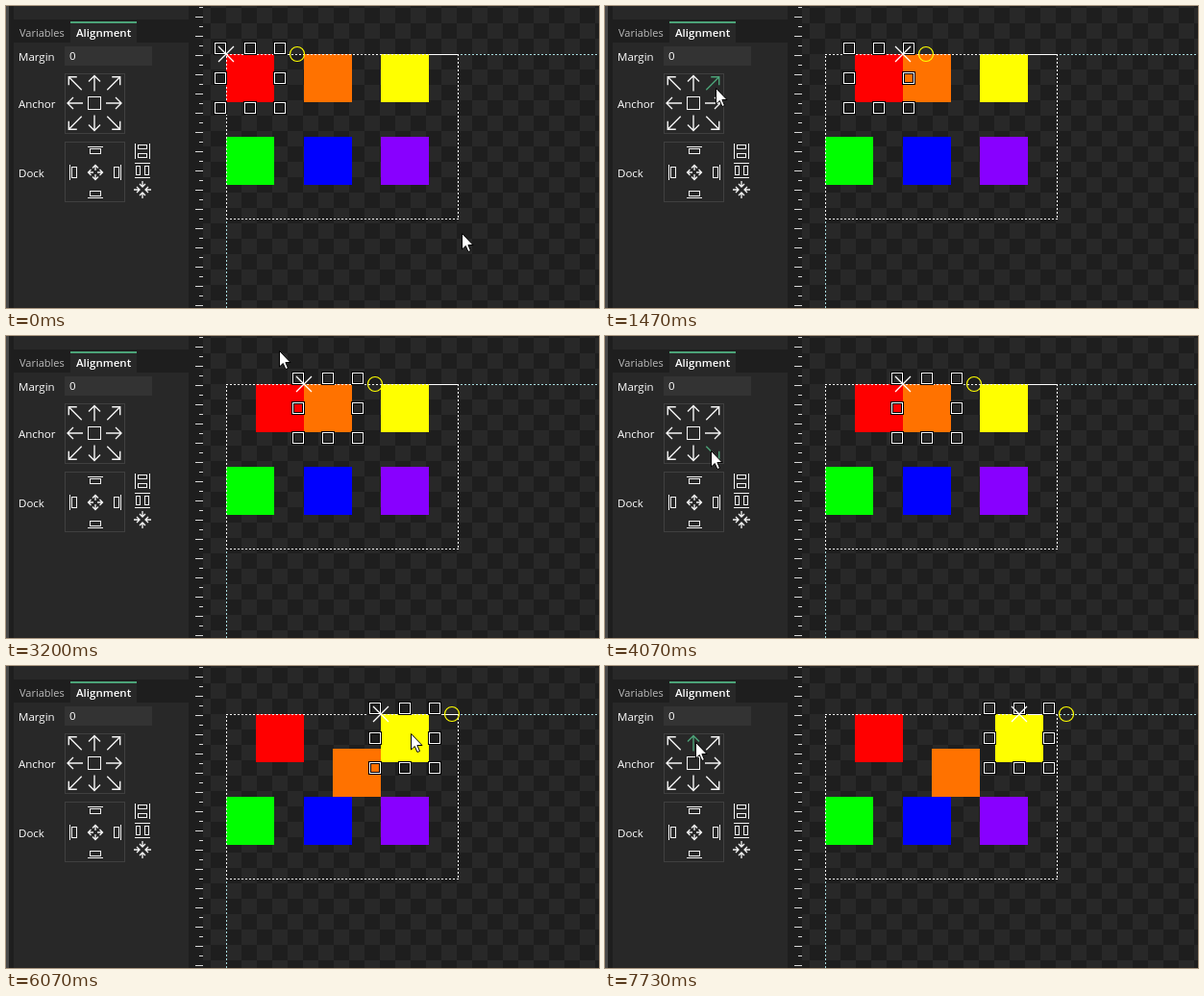
An HTML page with a canvas that plays this animation: 617x314 px, repeating every 8 s.

```html
<!DOCTYPE html>
<html lang="en">
<head>
<meta charset="utf-8">
<style>
html, body { margin: 0; width: 100%; height: 100%; overflow: hidden; background: #282828; }
canvas, svg { position: absolute; left: 0; top: 0; display: block; }
text { font: 11.5px "Open Sans", "Noto Sans", sans-serif; fill: #fff; }
</style>
</head>
<body>
<canvas id="stage" width="617" height="314"></canvas>
<svg width="617" height="314">
  <text x="14" y="32" style="font-size:11px;fill:#bbb">Variables</text>
  <text x="73" y="32" style="font-weight:600">Alignment</text>
  <text x="13" y="57">Margin</text>
  <text x="66" y="56">0</text>
  <text x="13" y="106">Anchor</text>
  <text x="13" y="178">Dock</text>
</svg>
<script>
const c = document.getElementById('stage').getContext('2d');
const LOOP = 8000, GREEN = '#4ca378', INK = '#f4f4f4', QUARTER = Math.PI / 2;
const BOX = { x: 229, y: 50, w: 241, h: 171 };

// Pointer moves, timed in ticks of 1/15 s; bow lifts the middle of the way
const START = [474, 236];
const moves = [
  { from: 0, to: 12, end: [115, 85], bow: 0 },
  { from: 27, to: 31.5, end: [346, 70], bow: 75 },
  { from: 46, to: 52, end: [106, 118], bow: 88 },
  { from: 52, to: 61, end: [110, 119], bow: 0 },
  { from: 71, to: 77, end: [402, 65], bow: 0 },
  { from: 77, to: 82, end: [421, 70], bow: 0 },
  { from: 96, to: 109, end: [98, 78], bow: 0 },
  { from: 109, to: 112, end: [94, 79], bow: 0 }
];

function mouseAt(n) {
  let [x, y] = START;
  for (const { from, to, end, bow } of moves) {
    if (n <= from) break;
    const t = Math.min(1, (n - from) / (to - from)), u = t * t * (3 - 2 * t);
    x += (end[0] - x) * u;
    y += (end[1] - y) * u - bow * 4 * u * (1 - u);
  }
  return [Math.round(x), Math.round(y)];
}

function squaresAt(n) {
  const sq = (color, x, y, px = 0, py = 0) => ({ color, x, y, px, py, w: 50, h: 50 });
  return [
    n < 22 ? sq('#f00', 229, 50) : sq('#f00', 260, 50, 1, 0),
    n < 66 ? sq('#ff7200', 310, 50) : sq('#ff7200', 340, 86, 1, 1),
    n < 116 ? sq('#ff0', 390, 50) : sq('#ff0', 406, 50, .5, 0),
    sq('#0f0', 229, 136), sq('#00f', 310, 136), sq('#80f', 390, 136)
  ];
}

const inside = (r, [x, y]) => x >= r.x && x < r.x + r.w && y >= r.y && y < r.y + r.h;

function fill(color, x, y, w, h) {
  c.fillStyle = color;
  c.fillRect(x, y, w, h);
}

function frame(color, x, y, w, h) {
  c.strokeStyle = color;
  c.lineWidth = 1;
  c.strokeRect(x + .5, y + .5, w, h);
}

// Each argument after width is one polyline as a flat list
function lines(color, width, ...polys) {
  c.strokeStyle = color;
  c.lineWidth = width;
  c.beginPath();
  for (const p of polys)
    for (let i = 0; i < p.length; i += 2) c[i ? 'lineTo' : 'moveTo'](p[i], p[i + 1]);
  c.stroke();
}

function dashed(color, ...polys) {
  c.setLineDash([2, 2]);
  lines(color, 1, ...polys);
  c.setLineDash([]);
}

// Clockwise, so the dashes of each side start at its own corner
function dashedFrame(color, x, y, w, h) {
  const r = x + w, b = y + h;
  dashed(color, [x, y + .5, r + 1, y + .5], [r + .5, y, r + .5, b + 1],
    [r + 1, b + .5, x, b + .5], [x + .5, b + 1, x + .5, y]);
}

function at(x, y, angle, draw) {
  c.save();
  c.translate(x, y);
  c.rotate(angle);
  draw();
  c.restore();
}

// Arrow along x: shaft from a to b, head at b
function arrow(color, width, a, b, head) {
  const back = b - Math.sign(b - a) * head;
  lines(color, width, [a, 0, b, 0], [back, -head, b, 0, back, head]);
}

function drawAnchor(mouse) {
  frame('#404040', 61, 70, 62, 62);
  for (let row = -1; row < 2; row++) for (let col = -1; col < 2; col++) {
    const x = 92 + col * 20, y = 101 + row * 20.5;
    const lit = Math.abs(mouse[0] - x) < 10 && Math.abs(mouse[1] - y) < 10;
    const color = lit ? GREEN : INK;
    if (!row && !col) { frame(color, 85, 94, 13, 13); continue; }
    const r = row && col ? 9.5 : 8;
    at(x, y, Math.atan2(row, col), () => arrow(color, 1.4, -r, r, 6));
  }
}

function drawDock() {
  frame('#404040', 61, 141, 62, 62);
  for (let i = 0; i < 4; i++) {
    at(93, 173, i * QUARTER, () => {
      lines(INK, 1, [26.5, -8, 26.5, 8]);
      c.strokeRect(19.5, -5.5, 5, 11);
      arrow(INK, 1.3, 2, 7.5, 3);
    });
    at(142, 191, i * QUARTER, () => arrow(INK, 1.3, 9, 3, 3));
  }
  for (let i = 0; i < 2; i++) at(142, 151 + i * 20, i * QUARTER, () => {
    lines(INK, 1, [-7.5, -8, -7.5, 8], [7.5, -8, 7.5, 8]);
    for (const y of [-6.5, 2.5]) c.strokeRect(-4.5, y, 9, 4);
  });
}

function drawPanel(mouse) {
  fill('#1e1e1e', 0, 0, 205, 314);
  fill('#484848', 0, 0, 3, 314);
  fill('#282828', 8, 0, 182, 14);
  fill('#282828', 8, 38, 182, 276);
  fill('#282828', 67, 16, 69, 22);
  fill(GREEN, 67, 16, 69, 2);
  fill('#333', 61, 42, 91, 20);
  drawAnchor(mouse);
  drawDock();
  for (let y = 0; y < 314; y += 10) {
    const w = y % 20 ? 8 : 4;
    fill('#d8d8d8', 205 - w, y + 1, w, 1);
  }
}

function drawChecker() {
  fill('#1e1e1e', 0, 0, 617, 314);
  for (let j = 0; j < 21; j++) for (let i = 0; i < 27; i++)
    if ((i + j) % 2) fill('#282828', 197 + i * 16, j * 16 - 14, 16, 16);
}

function drawSelection(s) {
  const cx = s.x + 25, cy = s.y + 25, px = s.x + s.px * 50, py = s.y + s.py * 50;
  for (let j = -1; j < 2; j++) for (let i = -1; i < 2; i++) if (i || j) {
    const x = cx + i * 31 - 6, y = cy + j * 31 - 6;
    frame('#000', x - 1, y - 1, 13, 13);
    frame('#000', x + 1, y + 1, 9, 9);
    frame('#fff', x, y, 11, 11);
  }
  at(px, py, 0, () => lines('#fff', 1.3, [-8, -8, 8, 8], [-8, 8, 8, -8]));
  c.strokeStyle = '#ff0';
  c.lineWidth = 1.2;
  c.beginPath();
  c.arc(cx + 49, py, 7.5, 0, 7);
  c.stroke();
}

function drawCursor([x, y], move) {
  const trace = p => { for (let i = 0; i < p.length; i += 2) c.lineTo(p[i], p[i + 1]); };
  c.save();
  c.translate(x + .5, y + .5);
  c.beginPath();
  if (move) for (let q = 0; q < 4; q++) {
    trace([1.5, -1.5, 6, -1.5, 6, -4.5, 11, 0, 6, 4.5, 6, 1.5]);
    c.rotate(QUARTER);
  } else trace([0, 0, 0, 16.5, 3.8, 13, 6.4, 19, 9, 18, 6.4, 12, 11.5, 12]);
  c.closePath();
  c.fillStyle = '#fff';
  c.strokeStyle = '#000';
  c.lineWidth = 1;
  c.fill();
  c.stroke();
  c.restore();
}

function draw(now) {
  const n = Math.floor(now % LOOP * .015 + .06);
  const mouse = mouseAt(n), before = mouseAt(n - 1), squares = squaresAt(n);
  const pressed = n === 41 || n === 91;
  // Hover trails the pointer by one tick
  const hover = !pressed && (squares.find(s => inside(s, before)) || (inside(BOX, before) && BOX));

  drawChecker();
  drawPanel(mouse);
  for (const s of squares) fill(s.color, s.x, s.y, s.w, s.h);
  dashed('#a8dce0', [229, 50.5, 617, 50.5], [229.5, 314, 229.5, 50]);
  dashedFrame('#fff', BOX.x, BOX.y, BOX.w, BOX.h);
  fill('#fff', 440, 50, 30, 1);
  if (hover) dashedFrame('#ff0', hover.x - 1, hover.y - 2, hover.w + 2, hover.h + 3);
  drawSelection(squares[n < 41 ? 0 : n < 91 ? 1 : 2]);
  drawCursor(mouse, hover && inside(BOX, mouse));
}

const start = performance.now();
function tick() {
  draw(performance.now() - start);
  requestAnimationFrame(tick);
}
tick();
</script>
</body>
</html>
```
